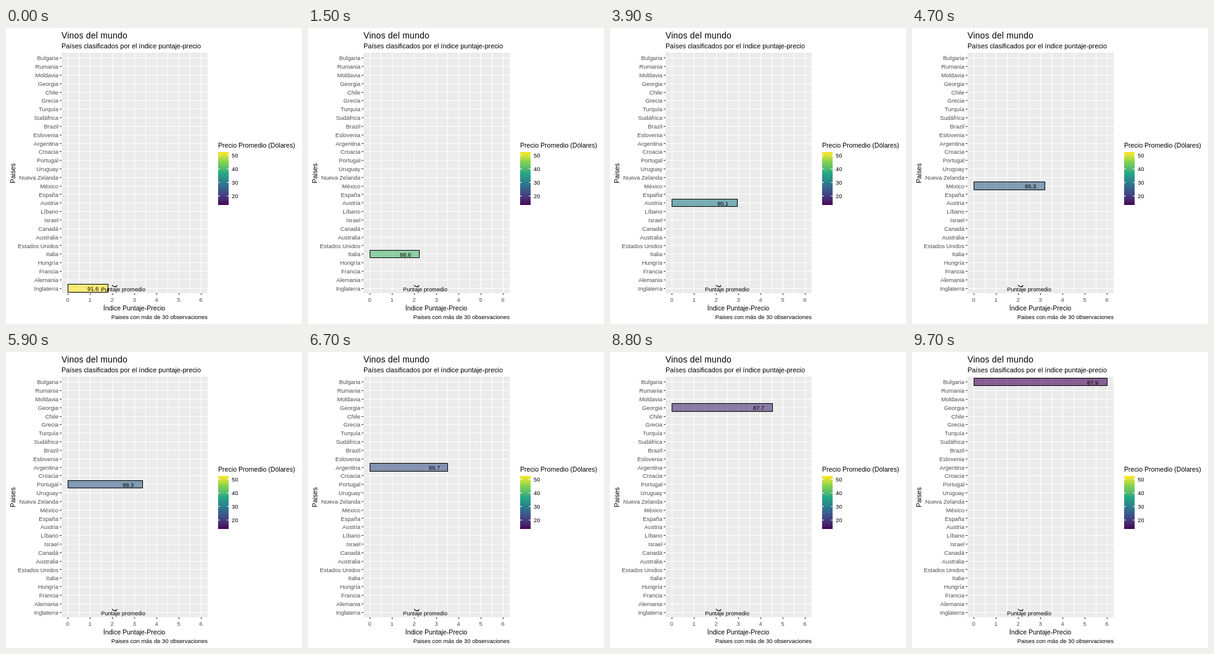
Recreate the animation shown at these times as an HTML page with a canvas. Size 480x480 px, loop 10000 ms.

```html
<!DOCTYPE html>
<html lang="es">
<head>
<meta charset="utf-8">
<title>Vinos del mundo</title>
<style>
  html, body { margin: 0; width: 100%; height: 100%; overflow: hidden; background: #fff; }
  canvas { display: block; }
</style>
</head>
<body>
<canvas id="chart" width="480" height="480"></canvas>
<script>
const ctx = document.getElementById('chart').getContext('2d');
const LOOP = 10000;
const FONT = '"Liberation Sans", Arial, sans-serif';
const PANEL = { left: 90, top: 40, right: 327, bottom: 430 };
const X0 = 100, UNIT = 36;
const STEP = (PANEL.bottom - PANEL.top) / 28.2;

// country, mean score, mean price, right end of the bar
const rows = [
  ['Inglaterra', 91.58, 51.68, 165],
  ['Alemania', 89.85, 42.26, 176],
  ['Francia', 88.85, 41.14, 178],
  ['Hungría', 89.19, 40.65, 179],
  ['Italia', 88.56, 39.66, 180],
  ['Estados Unidos', 88.56, 36.57, 187],
  ['Australia', 88.58, 35.44, 190],
  ['Canadá', 89.37, 35.71, 191],
  ['Israel', 88.47, 31.77, 201],
  ['Líbano', 87.69, 30.69, 203],
  ['Austria', 90.10, 30.76, 206],
  ['España', 87.29, 28.22, 212],
  ['México', 85.26, 26.79, 215],
  ['Nueva Zelanda', 88.30, 26.93, 218],
  ['Uruguay', 86.75, 26.40, 219],
  ['Portugal', 88.25, 26.22, 221],
  ['Croacia', 87.22, 25.45, 223],
  ['Argentina', 86.71, 24.51, 226],
  ['Eslovenia', 88.07, 24.81, 228],
  ['Brazil', 84.67, 23.77, 228],
  ['Sudáfrica', 88.06, 24.67, 229],
  ['Turquía', 88.09, 24.63, 230],
  ['Grecia', 87.28, 22.36, 241],
  ['Chile', 86.49, 20.79, 250],
  ['Georgia', 87.69, 19.32, 263],
  ['Moldavia', 87.20, 16.75, 288],
  ['Rumania', 86.40, 15.24, 304],
  ['Bulgaria', 87.94, 14.65, 316]
];

// six viridis anchors, blended in CIE Lab
const toLinear = v => v <= 0.04045 ? v / 12.92 : ((v + 0.055) / 1.055) ** 2.4;
const toGamma = v => v <= 0.0031308 ? 12.92 * v : 1.055 * v ** (1 / 2.4) - 0.055;
const labF = t => t > 0.008856 ? Math.cbrt(t) : 7.787 * t + 16 / 116;
const labInv = f => f ** 3 > 0.008856 ? f ** 3 : (f - 16 / 116) / 7.787;

function hexToLab(hex) {
  const [r, g, b] = [0, 2, 4].map(i => toLinear(parseInt(hex.slice(i, i + 2), 16) / 255));
  const x = labF((0.4124 * r + 0.3576 * g + 0.1805 * b) / 0.9505);
  const y = labF(0.2126 * r + 0.7152 * g + 0.0722 * b);
  const z = labF((0.0193 * r + 0.1192 * g + 0.9505 * b) / 1.089);
  return [116 * y - 16, 500 * (x - y), 200 * (y - z)];
}

function labToRgb([l, a, b]) {
  const fy = (l + 16) / 116;
  const x = 0.9505 * labInv(fy + a / 500);
  const y = labInv(fy);
  const z = 1.089 * labInv(fy - b / 200);
  return [
    3.2406 * x - 1.5372 * y - 0.4986 * z,
    -0.9689 * x + 1.8758 * y + 0.0415 * z,
    0.0557 * x - 0.204 * y + 1.057 * z
  ].map(v => Math.round(255 * toGamma(Math.max(0, Math.min(1, v)))));
}

const anchors = ['440154', '414487', '2a788e', '22a884', '7ad151', 'fde725'].map(hexToLab);

function viridis(u, alpha = 1) {
  const p = Math.max(0, Math.min(1, u)) * 5;
  const i = Math.min(4, Math.floor(p));
  const lab = anchors[i].map((c, k) => c + (anchors[i + 1][k] - c) * (p - i));
  return `rgba(${labToRgb(lab).join(',')},${alpha})`;
}

const priceColor = (price, alpha) => viridis((price - 14.65) / 37.03, alpha);
const rowY = i => PANEL.bottom - STEP * (0.6 + i);

function rect(x, y, w, h, color) {
  ctx.fillStyle = color;
  ctx.fillRect(x, y, w, h);
}

function text(str, x, y, size, align = 'left', color = '#000', spacing = 0) {
  ctx.font = `${size}px ${FONT}`;
  ctx.letterSpacing = spacing + 'px';
  ctx.textAlign = align;
  ctx.fillStyle = color;
  ctx.fillText(str, x, y);
}

function drawPanel() {
  rect(PANEL.left, PANEL.top, 237, 390, '#ebebeb');
  for (let k = 0; k <= 12; k++) rect(X0 + k * UNIT / 2, PANEL.top, 1, 390, '#fff');
  rows.forEach(([name], i) => {
    const y = rowY(i);
    const line = Math.round(y - 0.08);
    rect(PANEL.left, line, 237, 1, '#fff');
    rect(87, line, 3, 1, '#333');
    text(name, 85, Math.round(y + 4), 9.4, 'right', '#4d4d4d');
  });
  for (let k = 0; k <= 6; k++) {
    rect(X0 + k * UNIT, PANEL.bottom, 1, 3, '#333');
    text(k, X0 + k * UNIT, 444, 9.4, 'center', '#4d4d4d');
  }
}

function drawTitles() {
  text('Vinos del mundo', 90, 17, 13.9, 'left', '#000', 0.25);
  text('Países clasificados por el índice puntaje-precio', 90, 33, 10.85);
  text('Índice Puntaje-Precio', 208, 458, 10.55, 'center');
  text('Paises con más de 30 observaciones', 327, 472, 9.45, 'right');
  ctx.save();
  ctx.translate(15, 235.5);
  ctx.rotate(-Math.PI / 2);
  text('Paises', 0, 0, 10.8, 'center');
  ctx.restore();
}

function drawLegend() {
  text('Precio Promedio (Dólares)', 344, 194, 10.6);
  const g = ctx.createLinearGradient(0, 201, 0, 287);
  for (let i = 0; i <= 20; i++) g.addColorStop(1 - i / 20, viridis(i / 20));
  rect(344, 201, 17, 86, g);
  for (let k = 0; k < 4; k++) {
    const y = 206 + 22 * k;
    rect(344, y, 3, 1, '#fff');
    rect(358, y, 3, 1, '#fff');
    text(50 - 10 * k, 366, y + 4, 9.4);
  }
}

function drawBar(i) {
  const [, score, price, right] = rows[i];
  const y = rowY(i);
  const top = Math.floor(y + 0.2 - 0.45 * STEP);
  const bottom = Math.floor(y + 0.2 + 0.45 * STEP);
  rect(X0, top, right - X0 + 1, bottom - top + 1, priceColor(price, 0.6));
  ctx.strokeStyle = '#000';
  ctx.lineWidth = 1;
  ctx.strokeRect(X0 + 0.5, top + 0.5, right - X0, bottom - top);
  const x = Math.round(X0 + UNIT * score / price - 31.75);
  text(score.toFixed(1), x, Math.round(y + 4.5), 9.3);
}

function drawNote() {
  ctx.strokeStyle = '#000';
  ctx.lineWidth = 1.3;
  ctx.beginPath();
  ctx.moveTo(172, 416.8);
  ctx.bezierCurveTo(174, 420.4, 178, 420.4, 180.3, 417.3);
  ctx.stroke();
  text('Puntaje promedio', 154, 427, 9.2);
}

// bars hold for 400 ms at first, then for 300 ms
function barAt(t) {
  return t < 6700 ? Math.floor((t + 100) / 400)
                  : Math.min(27, 17 + Math.floor((t - 6700) / 300));
}

let start;
function frame(now) {
  if (start === undefined) start = now;
  rect(0, 0, 480, 480, '#fff');
  drawPanel();
  drawTitles();
  drawLegend();
  drawBar(barAt((now - start) % LOOP));
  drawNote();
  requestAnimationFrame(frame);
}
requestAnimationFrame(frame);
</script>
</body>
</html>
```
